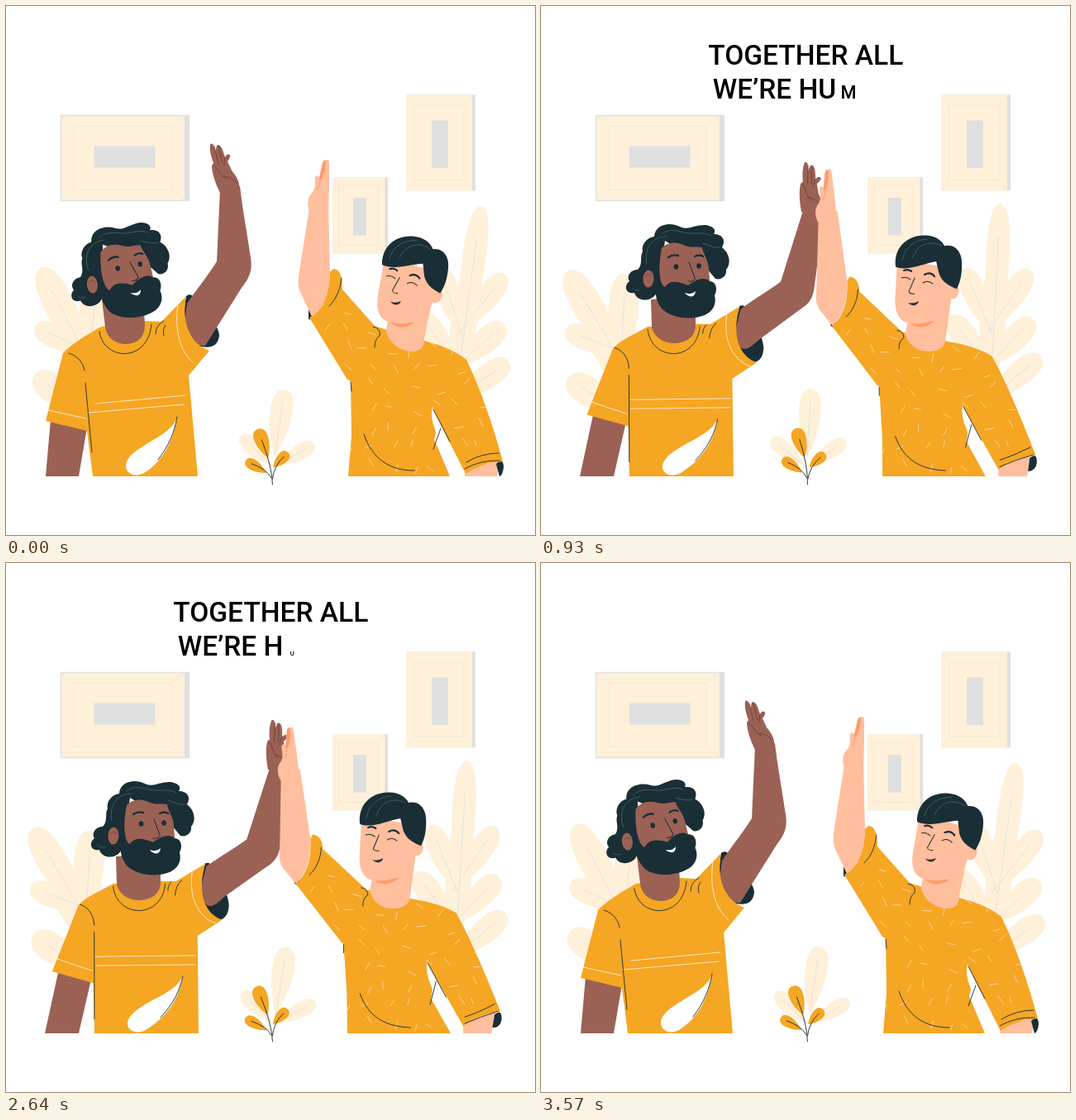
Recreate the animation shown at these times as an HTML page with a canvas. Size 640 px wide and 640 px high, loop 3640 ms.

```html
<!DOCTYPE html>
<html lang="en">
<head>
<meta charset="utf-8">
<title>Together</title>
<style>
html, body { margin: 0; width: 100%; height: 100%; overflow: hidden; background: #fff; }
canvas { display: block; width: 640px; height: 640px; }
</style>
</head>
<body>
<canvas id="stage" width="640" height="640"></canvas>
<script>
const ctx = document.getElementById('stage').getContext('2d');
const LOOP = 3640, STEP = 71.4, END = 3570;
const ORANGE = '#f5a623', BROWN = '#9b6155', PINK = '#ffbe9d', CORAL = '#ff9a6c',
  DARK = '#1a2e35', CREAM = '#fff0da', GREY = '#e0e0e0', WHITE = '#fff', BROWN_LINE = '#6d3f36';

const clamp = v => Math.max(0, Math.min(1, v));
const ease = v => (v = clamp(v), v * v * (3 - 2 * v));
const lerp = (a, b, w) => a + (b - a) * w;
// goes from rest (0) to the clap (1) and back again
const reach = (t, rise, fall) => t < 1800 ? ease(t / rise) : ease((END - t) / fall);
const wave = (t, cycles, delay) => Math.cos(2 * Math.PI * cycles * (t - delay) / END);

// blends two path strings that share the same commands
function mix(a, b, w) {
  const to = b.match(/-?\d+(\.\d+)?/g);
  let i = 0;
  return a.replace(/-?\d+(\.\d+)?/g, n => lerp(+n, +to[i++], w).toFixed(2));
}
const fill = (color, d) => { ctx.fillStyle = color; ctx.fill(new Path2D(d)); };
function line(color, width, d) {
  ctx.strokeStyle = color;
  ctx.lineWidth = width;
  ctx.lineCap = ctx.lineJoin = 'round';
  ctx.stroke(new Path2D(d));
}
function oval(color, x, y, rx, ry, turn = 0) {
  ctx.fillStyle = color;
  ctx.beginPath();
  ctx.ellipse(x, y, rx, ry, turn, 0, 7);
  ctx.fill();
}
function pivot(x, y, angle, dx, dy, draw) {
  ctx.save();
  ctx.translate(x + dx, y + dy);
  ctx.rotate(angle);
  ctx.translate(-x, -y);
  draw();
  ctx.restore();
}

function leaf(color, x, y, tx, ty, w, vein) {
  const dx = tx - x, dy = ty - y, len = Math.hypot(dx, dy);
  const nx = -dy / len * w, ny = dx / len * w;
  const at = (k, s) => (x + dx * k + nx * s) + ' ' + (y + dy * k + ny * s);
  fill(color, `M${x} ${y}C${at(.4, .9)} ${at(1, 1.2)} ${tx} ${ty}C${at(1, -1.2)} ${at(.4, -.9)} ${x} ${y}Z`);
  return () => vein && line(vein, .8, `M${x} ${y}L${at(.8, 0)}`);
}
const leaves = list => list.map(l => leaf(...l)).forEach(vein => vein());

function frame(x, y, w, h, side, border, inset, box) {
  ctx.fillStyle = GREY;
  ctx.fillRect(x - border, y - border, w + side + border, h + border * 2);
  ctx.fillStyle = CREAM;
  ctx.fillRect(x + border, y + border, w - border, h - border * 2);
  const [ix, iy] = inset, r = x + w, b = y + h;
  line('#efe5d5', .7, `M${x + ix} ${y + iy}H${r - ix}V${b - iy}H${x + ix}Z
    M${x + 2} ${y + 2}L${x + ix} ${y + iy}M${r} ${y + 1}L${r - ix} ${y + iy}
    M${x + 2} ${b - 1}L${x + ix} ${b - iy}M${r} ${b - 1}L${r - ix} ${b - iy}`);
  ctx.fillStyle = GREY;
  ctx.fillRect(...box);
}

function room(t) {
  frame(66.5, 132.5, 149.5, 103, 6, .7, [16, 13], [106.5, 169.5, 74, 26]);
  frame(484, 107.3, 80, 116, 4, 0, [10, 13], [515, 138.5, 20, 57.5]);
  frame(395.3, 207.3, 63.3, 92, 3.5, 0, [8, 10], [420, 232, 16, 45.5]);
  if (t > 2060 && t < 2240) {
    const k = (t - 2140) * .04;
    line(WHITE, 2.5, `M${398 + k} ${232 + k * .6}L${413 + k} ${241 + k * .6}`);
  }
  pivot(100, 480, .031 * (wave(t, 2, 70) - 1), 0, 0, () => leaves([
    [CREAM, 110, 450, 42, 317, 23, GREY],
    [CREAM, 118, 425, 35, 388, 19, GREY],
    [CREAM, 105, 500, 35, 446, 22, GREY],
    [CREAM, 98, 445, 112, 324, 23, GREY],
    [CREAM, 110, 480, 72, 370, 26]]));
  pivot(530, 470, .054 * (wave(t, 2, 210) - .75), 0, 0, () => leaves([
    [CREAM, 548, 440, 575, 242, 18, GREY],
    [CREAM, 546, 398, 604, 325, 18, GREY],
    [CREAM, 552, 400, 525, 317, 18, GREY],
    [CREAM, 540, 440, 603, 385, 19, GREY],
    [CREAM, 538, 480, 608, 430, 19, GREY],
    [CREAM, 548, 445, 503, 373, 19, GREY],
    [CREAM, 540, 490, 562, 320, 20]]));
}

function sprout(t) {
  const sway = wave(t, 3, 185);
  pivot(323, 578, .072 * (sway - .55), 0, 0, () => leaves([
    [CREAM, 325, 546, 337, 464, 17, GREY],
    [CREAM, 321, 556, 284, 520, 12, GREY],
    [CREAM, 327, 556, 373, 530, 12, GREY]]));
  pivot(323, 578, .05 * (.7 - sway), 0, 0, () => {
    leaves([
      [ORANGE, 317, 547, 304, 512, 11],
      [ORANGE, 323, 558, 341, 540, 8.5],
      [ORANGE, 315, 565, 290, 550, 8.5]]);
    line(DARK, .9, `M322.5 579Q322 558 309 525M322.5 572Q324 556 336 545M321 571Q315 560 297 554`);
  });
}

function beardedMan(t) {
  const w = reach(t, 1080, 1020), h = reach(t, 880, 860);
  const m = (a, b) => mix(a, b, w);
  fill(BROWN, m('M54 500L48 569L88 569L98 510Z', 'M64 492L47 569L88 569L103 504Z'));
  fill(DARK, m('M218 351C224 346 228 352 236 362C250 380 258 390 258 399C256 412 248 414 236 412C220 408 212 380 218 351Z',
    'M241 364C248 360 250 368 256 378C264 390 270 406 270 415C269 430 261 434 250 432C234 426 233 384 241 364Z'));
  fill(BROWN, m('M215 392L219 360C232 341 245 325 255 309L259 221L283 218C286 245 291 270 296 305C299 322 292 332 285 341L241 411C228 411 218 405 215 392Z',
    'M235 398L243 367C260 355 278 345 292 335L320 250L342 248C341 280 339 300 333 340C331 356 326 362 316 368L264 404C252 416 242 424 235 398Z'));
  pivot(271, 222, lerp(0, .28, w), 60 * w, 28 * w, () => {
    fill(BROWN, `M259 226C252 212 249 200 249 193L251 190C248 182 246 174 247 167Q250 165 252 170L254 176
      Q254 167 257 168Q260 169 262 174L265 183Q267 178 271 180Q272 183 268 188L273 199Q281 208 282 216L283 226Z`);
    line(BROWN_LINE, .8, 'M252 170L257 191M257 170L262 190M265 183L264 193M252 194C258 198 259 207 267 209M262 206Q274 206 279 214');
  });

  fill(ORANGE, m('M115 388C98 398 80 408 69 420L48 502L98 514L105 569L232 569L221 447L246 417C222 408 212 382 218 351L188 382L167 381Z',
    'M130 388C112 398 97 404 88 414L56 494L106 508L107 569L233 569L232 451L262 432C238 424 232 394 242 364L206 385L187 385Z'));
  line(DARK, .9, m('M76 420C88 423 94 434 95 441M96 456L104 540', 'M90 413C103 417 107 430 107 438M107 446L107 552'));
  line(CREAM, .9, m('M109 481L217 471M100 492L215 482M51 489L97 499M208 361C204 390 209 416 226 431',
    'M108 476L230 475M109 487L230 486M60 478L104 493M226 372C221 398 229 427 254 436'));
  line(DARK, .9, m('M181 397Q181 386 191 381M191 399Q189 391 193 386', 'M205 402Q206 390 213 384M196 396Q196 390 200 386'));
  fill(WHITE, m('M207 497C203 510 190 518 178 525C160 536 146 544 145 556C145 568 160 571 170 563C190 550 203 525 207 497Z',
    'M214 500C208 513 194 520 181 527C162 537 148 546 147 557C147 568 162 571 172 563C193 550 210 528 214 500Z'));
  line(DARK, .9, m('M207 497C204 515 197 532 184 549', 'M214 500C211 516 203 533 187 550'));
  line(DARK, .9, m('M113 394C118 430 172 432 176 385', 'M130 391C134 431 190 431 193 388'));
  fill(BROWN, mix('M116 355L120 388C122 403 134 409 146 409C160 408 168 400 168 386L166 350Z',
    'M133 355L134 389C138 403 150 408 162 408C178 407 187 399 187 386L187 350Z', h));

  pivot(165, 375, -.157 * (1 - h), -19 * (1 - h), lerp(1, 0, h), () => {
    fill(DARK, `M150 284L142 345L136 352C127 359 115 355 113 347C102 349 100 338 107 333C103 326 109 319 117 319
      C124 312 119 303 123 297C121 289 128 280 137 279C138 264 156 261 168 267C178 272 186 264 200 265C210 267 212 272 209 276
      C220 276 224 284 219 292C229 300 230 312 224 319C225 327 218 332 211 330L196 312Z`);
    fill(BROWN, `M146 293C152 286 162 285 170 288C182 294 189 290 195 292C196 300 202 306 203 318
      L205 345L198 366L146 362C142 345 142 312 146 293Z`);
    oval(BROWN, 130, 330, 6.5, 10.5, .05);
    line(BROWN_LINE, .8, 'M127 327Q132 322 133 328');
    fill(DARK, `M137 322L143 318C144 330 145 338 150 340C156 331 166 333 178 338C187 331 197 327 204 333
      C212 333 214 343 210 350C213 362 207 370 198 374C180 381 158 377 147 367C139 358 137 346 137 322Z`);
    fill(WHITE, 'M174 347Q182 350 187 345Q186 352 181 351.5Q176 350 174 347Z');
    oval(DARK, 163.5, 315.5, 2.8, 3.2);
    oval(DARK, 191, 314.5, 2.8, 3.2);
    line(DARK, 2.4, 'M154 304Q160 300 166 302M186 303Q192 300 196 303');
    line(DARK, 1, 'M179 310L186.5 330Q184 334 178 333');
    line('#536a72', .7, `M128 312C124 292 136 278 153 279M146 276C158 266 172 276 184 275Q200 274 206 278
      M196 287Q212 294 216 292M111 341Q114 345 120 344`);
  });
}

let seed = 7;
const rand = () => (seed = seed * 16807 % 2147483647) / 2147483647;
const ticks = [];
for (let y = 334; y < 565; y += 24)
  for (let x = 372; x < 602; x += 28)
    ticks.push([x + rand() * 18, y + rand() * 16, rand() * 3.1, 3.5 + rand() * 2]);

function darkHairedMan(t) {
  const w = reach(t, 1200, 1070);
  const h = reach(t, 1060, 860) - .2 * ease((t - 1650) / 400) * ease((2700 - t) / 450);
  const m = (a, b) => mix(a, b, w);
  fill(PINK, m('M555 569L556 556Q575 546 597 552L594 569Z', 'M553 569L553 550Q572 540 592 543L587 569Z'));
  fill(DARK, m('M593 554Q602 546 602 558Q601 568 597 569L590 569Z', 'M591 546Q600 538 599.5 552Q598 562 588 562Z'));
  fill(DARK, m('M366 366L366 379L376 380L372 368Z', 'M348 380L348 388L356 394L354 382Z'));
  const shirt = m(
    `M396 318Q407 318 407 343L446 387C466 394 490 400 506 405C530 411 548 420 557 428C575 465 590 510 601 551Q576 552 556 566
      L516 487L537 569L414 569L418 520L417 454L413 452L367 377C384 368 391 348 392 322Z`,
    `M370 329Q381 330 382 346L436 396C455 397 470 402 489 406C515 410 532 416 544 423C562 455 583 505 598 542Q572 545 553 560
      L509 483L538 569L413 569L412 520L408 461L406 460L350 389C363 377 369 358 367 334Z`);
  fill(ORANGE, shirt);
  ctx.save();
  ctx.clip(new Path2D(shirt));
  let marks = '';
  for (const [x, y, a, r] of ticks) {
    const lift = w * (569 - y) / 244;
    const px = x - 26 * lift, py = y + 9 * lift;
    const dx = Math.cos(a) * r, dy = Math.sin(a) * r;
    marks += `M${px - dx} ${py - dy}L${px + dx} ${py + dy}`;
  }
  line('#fbe3b5', .8, marks);
  ctx.restore();
  fill(WHITE, m('M516 485L554 569L537 569L518 524Q521 517 519 512Q513 498 516 485Z',
    'M509 482L553 569L538 569L514 527Q517 518 514 511Q507 496 509 482Z'));
  line(DARK, .9, m('M433 518C443 548 464 562 494 562M526 511L517 536M517 488L537 527M557 552Q575 541 596 541M555 560Q574 549 597 550',
    'M428 521C438 550 460 561 489 562M520 506L513 534M510 484L532 525M555 549Q572 544 591 533M555 557Q574 549 595 542'));
  line(DARK, .9, m('M406 329C404 345 399 355 391 363M444 388Q454 390 452 399Q446 403 446 413M417 455L418 466',
    'M380 345C380 358 374 371 366 378M429 393Q437 394 437 402Q431 405 431 415M408 462L408 472'));
  fill(PINK, m('M367 244L355 320C353 332 353 340 357 348L370 376C384 366 391 348 392 325L390 236Z',
    'M331 258L330 345C329 360 330 364 334 370L350 389C363 376 368 356 367 334L354 250Z'));
  pivot(379, 246, -.15 * w, -37 * w, 14 * w, () => {
    fill(PINK, `M368 250C364 242 364 232 370 226C376 220 373 212 374 207Q377 203 379 208L383 190Q385 185 387 187
      Q391 184 391 190L391 215L390 250Z`);
    fill(CORAL, 'M379 208L383 190Q385 185 387 187Q386 203 381 211Z');
    line('#f39a78', .8, 'M379 208Q381 216 376 222M385 201L387 187');
  });
  fill(PINK, mix('M463 372L460 393C463 409 480 419 493 418C502 417 506 412 506 402L518 345Z',
    'M445 372L440 396C443 411 456 419 470 418C484 417 488 411 489 402L497 342Z', h));

  pivot(470, 380, .12 * (1 - h), 19 * (1 - h), 1.5 * (1 - h), () => {
    fill(CORAL, 'M444 383Q460 395 475 381Z');
    oval(PINK, 498, 345, 6.5, 9.5, .2);
    fill(PINK, 'M430 306L427.5 354C427 377 436 385 452 384.5C474 384 489 374 495 352L502 318Z');
    line(CORAL, .8, 'M497 344Q501 339 502 344');
    fill(DARK, `M428 316C425 294 440 278 462 277.5C475 277 483 283 487 290C501 287 509 299 508 314
      C508 326 506 334 502 342C490 338 482 331 480 322L477 309C460 312 444 321 428 316Z`);
    line('#536a72', .7, 'M436 308C438 293 450 283 466 282M448 305C453 290 467 282 483 290');
    line(DARK, 1, 'M435 329Q441 327 446 331M461 335Q467 331 473 336');
    line(DARK, 2.2, 'M438 320Q443 318 447 321M463 325Q470 321 475 327');
    line(DARK, 1, 'M451 329L444 346Q446 349 451 348');
    fill(DARK, 'M443 359Q450 361 456 357Q455 362 450 362.5Q446 362 443 359Z');
    line(CORAL, .8, 'M447 362.5Q451 363.5 454 361');
  });
}

const lines = ['TOGETHER ALL', 'WE’RE HUMAN'];
function caption(t) {
  const part = t < 1800 ? ease((t + 30) / 1195) : ease((3530 - t) / 1195);
  const shown = part * lines.join('').length;
  ctx.font = '500 33.5px Roboto, sans-serif';
  ctx.fillStyle = '#000';
  ctx.textAlign = 'center';
  let index = 0;
  lines.forEach((text, row) => {
    const left = 320.3 - ctx.measureText(text).width / 2;
    [...text].forEach((char, i) => {
      const size = clamp(shown - index++);
      if (size < .06) return;
      const end = ctx.measureText(text.slice(0, i + 1)).width;
      ctx.save();
      ctx.translate(left + end - ctx.measureText(char).width / 2, 71.3 + row * 40.2);
      ctx.scale(size, size);
      ctx.fillText(char, 0, 0);
      ctx.restore();
    });
  });
}

function draw(now) {
  const t = Math.min(END, Math.floor((now % LOOP + 2) / STEP) * STEP);
  ctx.clearRect(0, 0, 640, 640);
  room(t);
  sprout(t);
  beardedMan(t);
  darkHairedMan(t);
  caption(t);
}

const start = performance.now();
function tick() {
  draw(performance.now() - start);
  requestAnimationFrame(tick);
}
tick();
</script>
</body>
</html>
```
